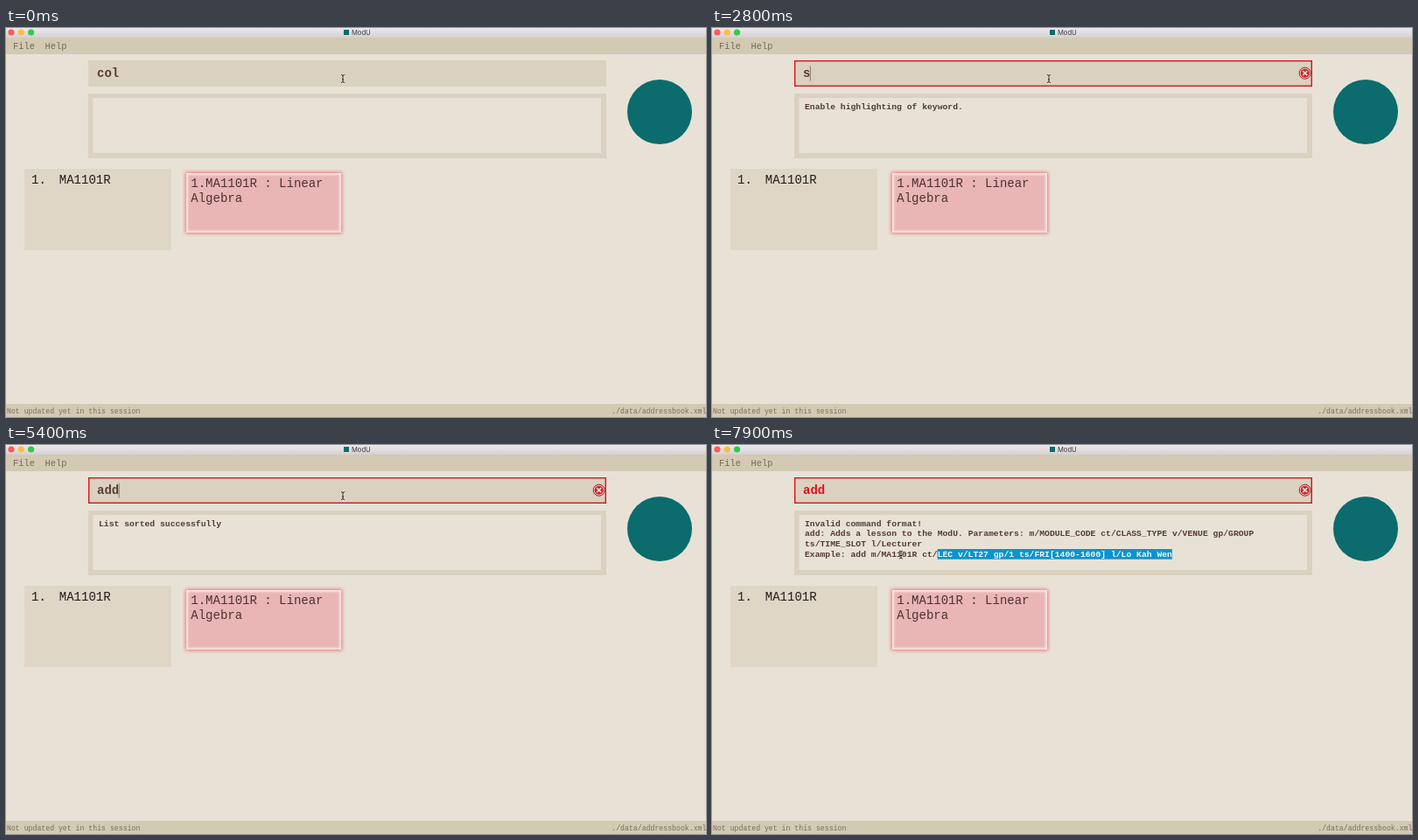
These frames come from a looping animation (800 by 445 pixels, 8000 ms). An HTML page:

```html
<!DOCTYPE html>
<html lang="en">
<head>
<meta charset="utf-8">
<title>Module planner</title>
<style>
html, body { margin: 0; width: 100%; height: 100%; overflow: hidden; background: #e8e2d6; }
svg { display: block; width: 800px; height: 445px; }
text { font-family: "Liberation Mono", "Courier New", monospace; white-space: pre; }
.bar { fill: #d4c9b3; }
.box { fill: #dad1c0; }
.menu { font-size: 10.4px; fill: #776a5c; }
.status { font-size: 8.2px; fill: #7a6d60; }
.big { font-size: 14px; fill: #4b332f; }
.cmd { font-size: 14px; font-weight: bold; }
.out { font-size: 9.72px; font-weight: bold; fill: #553a33; }
</style>
</head>
<body>
<svg viewBox="0 0 800 445">
  <defs>
    <linearGradient id="chrome" x2="0" y2="1">
      <stop stop-color="#ebe9eb"/><stop offset="1" stop-color="#d3d1d3"/>
    </linearGradient>
    <filter id="glow" x="-10%" y="-20%" width="120%" height="140%"><feGaussianBlur stdDeviation="2"/></filter>
    <filter id="soft" x="-10%" y="-20%" width="120%" height="140%"><feGaussianBlur stdDeviation="1.3"/></filter>
    <clipPath id="card"><rect x="206" y="166" width="177" height="68"/></clipPath>
  </defs>

  <rect width="800" height="445" fill="#e8e2d6"/>
  <rect width="800" height="11" fill="url(#chrome)"/>
  <circle cx="6" cy="5" r="3.6" fill="#fc5b57"/>
  <circle cx="17.3" cy="5" r="3.6" fill="#fdbc40"/>
  <circle cx="28.6" cy="5" r="3.6" fill="#34c84a"/>
  <rect x="386" y="2" width="6" height="6" fill="#0b6b6d"/>
  <text x="395" y="8" style="font:7.6px Inter, sans-serif" fill="#403e40">ModU</text>

  <rect class="bar" y="11" width="800" height="19"/>
  <text class="menu" x="8" y="24">File</text>
  <text class="menu" x="44.5" y="24">Help</text>
  <rect class="bar" y="430" width="800" height="15"/>
  <text class="status" x="1" y="440.5">Not updated yet in this session</text>
  <text class="status" x="692.3" y="440.5">./data/addressbook.xml</text>

  <circle cx="747" cy="96" r="37" fill="#0b6b6d"/>

  <rect class="box" x="94" y="37" width="592" height="30"/>
  <rect id="border" x="94.7" y="37.7" width="590.6" height="28.6" fill="none" stroke-width="1.4"/>
  <g id="error" fill="none">
    <circle cx="677.7" cy="51.7" r="6.5" fill="#e6d3c6" stroke="#8f2024"/>
    <circle cx="677.7" cy="51.7" r="5" fill="#d61c24"/>
    <path d="M675.2 49.2l5 5m0-5l-5 5" stroke="#f1e3da" stroke-width="1.7"/>
  </g>
  <text class="cmd" id="cmd" x="104" y="56"></text>
  <rect id="caret" y="43.5" width="1" height="17" fill="#8a7d70"/>

  <rect class="box" x="94" y="75" width="592" height="74"/>
  <rect x="99.5" y="80" width="580.5" height="63" fill="#e8e2d6"/>
  <g id="out"></g>
  <rect id="mark" y="119" height="11.7" fill="#0a94d0"/>
  <text class="out" id="picked" style="fill:#f4f8fa"></text>

  <rect x="21" y="161" width="168" height="93" fill="#dfd6c6"/>
  <text class="big" x="29" y="177.5" style="fill:#211c1a">1.</text>
  <text class="big" x="60.8" y="177.5" style="fill:#211c1a">MA1101R</text>

  <rect x="205" y="165" width="179" height="70" fill="#ee6f72" filter="url(#glow)"/>
  <rect x="206" y="166" width="177" height="68" fill="#e9b5b5"/>
  <g clip-path="url(#card)">
    <rect x="206" y="166" width="177" height="68" fill="none" stroke="#f8e6e2" stroke-width="4" filter="url(#soft)"/>
  </g>
  <text class="big" x="211.3" y="181.5">1.MA1101R : Linear</text>
  <text class="big" x="211.3" y="199.3">Algebra</text>

  <g id="pointer" fill="none">
    <path id="beam" d="M-2-4.5Q0-4.5 0-3Q0-4.5 2-4.5M0-3V3M-2 4.5Q0 4.5 0 3Q0 4.5 2 4.5M-1 1H1" stroke="#f5f1ea" stroke-width="2.2" stroke-opacity=".7"/>
    <use href="#beam" style="stroke:#000"/>
    <path d="M-2-4.5Q0-4.5 0-3Q0-4.5 2-4.5M0-3V3M-2 4.5Q0 4.5 0 3Q0 4.5 2 4.5M-1 1H1" stroke="#25201e"/>
  </g>
</svg>
<script>
const LOOP = 8000, LEFT = 106, CHAR = 9.72 * 0.6, LINE = 11.7, TOP = 92.7;
const RED = '#d8141c', GREEN = '#15871d', BROWN = '#5a3d37';
const $ = id => document.getElementById(id);
const set = (id, attrs) => {
  for (const key in attrs) $(id).setAttribute(key, attrs[key]);
};

const usage = [
  'Invalid command format!',
  'add: Adds a lesson to the ModU. Parameters: m/MODULE_CODE ct/CLASS_TYPE v/VENUE gp/GROUP',
  'ts/TIME_SLOT l/Lecturer',
  'Example: add m/MA1101R ct/LEC v/LT27 gp/1 ts/FRI[1400-1600] l/Lo Kah Wen'
];
const example = usage[3];

// [time, typed text]
const keys = [
  [-600, 'col'], [200, 'colo'], [400, 'color'], [1100, ''],
  [2700, 's'], [2900, 'so'], [3100, 'sor'], [3300, 'sort'], [3900, ''],
  [4900, 'a'], [5100, 'ad'], [5200, 'add'], [5600, 'add ']
];
// [time, output lines, border colour, text colour]
const states = [
  [0, [], 'none', BROWN],
  [1100, ['Enable highlighting of keyword.'], RED, BROWN],
  [3900, ['List sorted successfully'], GREEN, BROWN],
  [4900, ['List sorted successfully'], RED, BROWN],
  [6600, usage, RED, RED]
];
const latest = (list, t) => list.filter(item => item[0] <= t).pop();
const ramp = (t, a, b) => Math.min(1, Math.max(0, (t - a) / (b - a)));
const dragX = t => 527 - 311 * ramp(t, 7500, 7900);

let shown;
function draw(t) {
  const [keyTime, typed] = latest(keys, t);
  const state = latest(states, t);
  const [, lines, border, ink] = state;

  if (state !== shown) {
    $('out').innerHTML = lines.map((line, i) =>
      `<text class="out" x="${LEFT}" y="${TOP + i * LINE}">${line}</text>`).join('');
    shown = state;
  }
  $('cmd').textContent = typed;
  set('cmd', { fill: ink });
  set('border', { stroke: border });
  set('error', { visibility: border === RED ? 'visible' : 'hidden' });

  const lastPress = Math.max(keyTime, t >= 6600 ? 6600 : keyTime);
  const caretOn = t < 7450 && (t - lastPress) % 1000 < 500;
  set('caret', { x: 103.5 + typed.length * 8.4, visibility: caretOn ? 'visible' : 'hidden' });

  // Pointer travels to the end of the example, then drags left.
  const p = ramp(t, 6950, 7400), ease = p * p * (3 - 2 * p);
  const x = t < 7500 ? 385 + 142 * ease : dragX(t);
  set('pointer', { transform: `translate(${x} ${58 + 67.5 * ease})` });

  // The selection trails the pointer slightly.
  const from = Math.min(example.length, Math.round((dragX(t - 54) - LEFT) / CHAR));
  const start = LEFT + from * CHAR;
  set('mark', { x: start, width: (example.length - from) * CHAR });
  set('picked', { x: start, y: TOP + 3 * LINE });
  $('picked').textContent = example.slice(from);
}

function tick() {
  draw(performance.now() % LOOP);
  requestAnimationFrame(tick);
}
tick();
</script>
</body>
</html>
```
